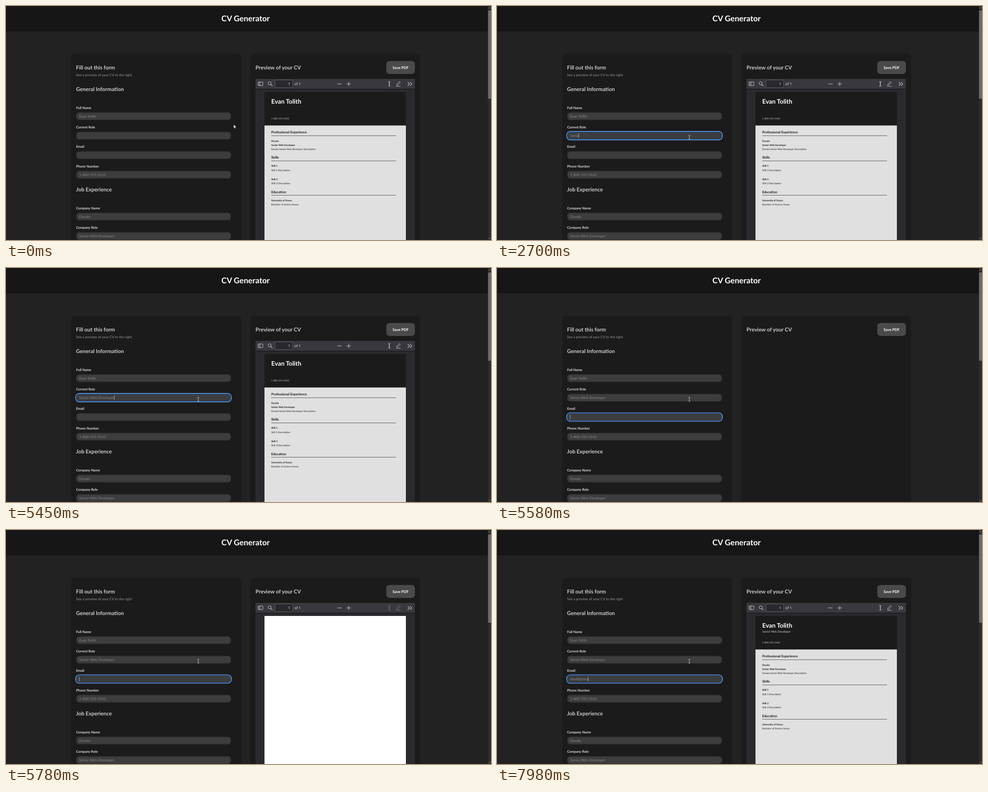
Animation, 1077 px wide and 520 px high, one loop 8 s. Source, as an HTML page:

```html
<!DOCTYPE html>
<html lang="en">
<head>
<meta charset="utf-8">
<title>CV Generator</title>
<style>
html, body { margin: 0; width: 100%; height: 100%; overflow: hidden; background: #222; }
svg { display: block; width: 100vw; height: 100vh; }
text { font-family: Lato, sans-serif; text-rendering: geometricPrecision; white-space: pre; }
</style>
</head>
<body>
<svg id="stage" viewBox="0 0 1077 520"></svg>
<script>
const LOOP = 8000;
const stage = document.getElementById('stage');

function el(parent, tag, attrs, content) {
  const node = document.createElementNS('http://www.w3.org/2000/svg', tag);
  for (const key in attrs) node.setAttribute(key, attrs[key]);
  if (content !== undefined) node.textContent = content;
  parent.appendChild(node);
  return node;
}
const group = parent => el(parent, 'g', {});
const rect = (parent, x, y, width, height, fill, rx = 0, more = {}) =>
  el(parent, 'rect', { x, y, width, height, fill, rx, ...more });
const path = (parent, d, stroke, width = 1, more = {}) =>
  el(parent, 'path', { d, stroke, 'stroke-width': width, fill: 'none', ...more });
const text = (parent, x, y, size, fill, content, bold = false, more = {}) =>
  el(parent, 'text', { x, y, 'font-size': size, fill, 'font-weight': bold ? 700 : 400, ...more }, content);
const show = (node, on) => node.setAttribute('visibility', on ? 'inherit' : 'hidden');

const PERSON = 'Evan Tolith', PHONE = '1-800-555-0142', COMPANY = 'Dovalo';
const ROLE = 'Senior Web Developer', MAIL = 'email@ema';

// Page frame
rect(stage, 0, 0, 1077, 520, '#222222');
rect(stage, 0, 0, 1070, 56.5, '#161616');
text(stage, 532, 34, 17.6, '#ffffff', 'CV Generator', true, { 'text-anchor': 'middle' });
rect(stage, 1070, 0, 7, 520, '#2c2c2c');
rect(stage, 1070.5, 10, 6.5, 196, '#6c6c6c');
path(stage, 'M1071.5 5.5l2.3-2.5 2.3 2.5M1071.5 515l2.3 2.5 2.3-2.5', '#8a8a8a');
rect(stage, 145, 106, 377, 440, '#1b1b1b', 8);
rect(stage, 542.5, 106, 377, 440, '#1b1b1b', 8);

// Form
const heading = (x, y, label) => text(stage, x, y, 11.83, '#cccccc', label, true);
heading(155.5, 141, 'Fill out this form');
text(stage, 155.5, 155.6, 7.7, '#9a9a9a', 'See a preview of your CV to the right');
heading(155.5, 189, 'General Information');
heading(155.5, 412.4, 'Job Experience');

function field(label, y, value) {
  text(stage, 155.7, y - 15.8, 7.5, '#dedede', label, true);
  rect(stage, 156.5, y - 7.7, 342.5, 15.8, '#3d3d3d', 6, { stroke: '#323232', 'stroke-width': 1.4 });
  const ring = group(stage);
  rect(ring, 154.6, y - 9.4, 346, 19, 'none', 8, { stroke: '#8db9f2', 'stroke-width': 1.1 });
  rect(ring, 155.6, y - 8.4, 344, 17, 'none', 7, { stroke: '#1067dc', 'stroke-width': 1.1 });
  const entry = text(stage, 162.4, y + 3, 7.93, '#868686', value);
  const caret = rect(stage, 162, y - 5, 1, 10, '#a8a8a8');
  show(ring, false);
  show(caret, false);
  return { ring, entry, caret };
}
field('Full Name', 244.6, PERSON);
const roleField = field('Current Role', 288, '');
const mailField = field('Email', 331.2, '');
field('Phone Number', 374.6, PHONE);
field('Company Name', 467.7, COMPANY);
field('Company Role', 511, ROLE);

// Preview
heading(554, 141, 'Preview of your CV');
rect(stage, 844.5, 122.3, 63.5, 28.6, '#4a4a4a', 7);
text(stage, 876.3, 139.7, 8.3, '#ffffff', 'Save PDF', true, { 'text-anchor': 'middle' });

const viewer = group(stage);
rect(viewer, 554, 162, 354, 358, '#2a2a2e');
rect(viewer, 554, 162, 354, 22, '#38383d');
rect(viewer, 554, 184, 354, 0.8, '#0c0c0d');
const ICON = '#d2d2d4';
rect(viewer, 559.8, 168.8, 10.6, 8, 'none', 1.2, { stroke: ICON });
path(viewer, 'M564 169v8M561.2 171h1.4M561.2 173h1.4M561.2 175h1.4', ICON, 0.8);
el(viewer, 'circle', { cx: 585.5, cy: 171.8, r: 3.4, fill: 'none', stroke: ICON });
path(viewer, 'M588 174.4l3.6 3.6', ICON, 1.2);
rect(viewer, 597.5, 164.5, 39, 17, '#29292d', 1.5, { stroke: '#606064', 'stroke-width': 0.9 });
path(viewer, 'M735.5 173.2h9.5M756.5 173.2h9M761 168.7v9', ICON);
path(viewer, 'M750.5 167.5v11.5M884.5 167.5v11.5', '#2b2b30');
path(viewer, 'M892 169.2l4 4-4 4M897 169.2l4 4-4 4', ICON, 1.1);
const tools = group(viewer);
path(tools, 'M848.6 167.7q2.6 0 2.6 1.5v7.6q0 1.5-2.6 1.5M853.8 167.7q-2.6 0-2.6 1.5v7.6q0 1.5 2.6 1.5', ICON);
path(tools, 'M867.5 176.2l.7-2.8 5.4-5.6 2 2-5.5 5.6zM866.5 178.4h9.5', ICON, 0.9);
const count = group(viewer);
const ui = { style: 'font-family:"Open Sans",sans-serif' };
text(count, 626.6, 176.2, 8.2, '#f0f0f2', '1', false, ui);
text(count, 640.2, 176.2, 8.2, '#e4e4e6', 'of 1', false, ui);

const blank = rect(viewer, 574, 191, 314, 329, '#ffffff');
const cv = group(viewer);
rect(cv, 574, 191, 314, 329, '#e0e0e0');
rect(cv, 574, 191, 314, 74.5, '#1b1b1b');
const cvText = (y, label, bold, size = 5.3, fill = '#161616') => text(cv, 589, y, size, fill, label, bold);
cvText(217.3, PERSON, true, 13.75, '#ffffff');
const cvRole = cvText(228.2, ROLE, false, 6.4, '#d0d0d0');
cvText(252.2, PHONE, false, 5.3, '#d0d0d0');
for (const [y, label] of [[283.3, 'Professional Experience'], [339.3, 'Skills'], [415.6, 'Education']]) {
  cvText(y, label, true, 7.45);
  rect(cv, 589, y + 4.5, 277, 0.8, '#333333');
}
cvText(301.5, COMPANY, true);
cvText(310.6, ROLE, true);
cvText(319.6, `${COMPANY} ${ROLE} Description`);
cvText(357.4, 'Skill 1', true);
cvText(366.6, 'Skill 1 Description');
cvText(386.6, 'Skill 2', true);
cvText(395.6, 'Skill 2 Description');
cvText(434, 'University of Xxxxx', true);
cvText(443, 'Bachelor of Science Xxxxx');

// Pointers, drawn around their hot spots
const arrow = el(stage, 'path', {
  d: 'M0 0V8.6L2 6.8 3.3 9.8 4.7 9.2 3.4 6.3H6.2Z',
  fill: '#ffffff', stroke: '#000000', 'stroke-width': 0.5
});
const beam = path(stage, 'M-2-4.2h1.4l.6.5.6-.5h1.4M0-3.7v7.6M-2 4.4h1.4l.6-.5.6.5h1.4', '#d0d0d0', 0.9);

const roleKeys = [2180, 2380, 2500, 2600, 2700, 2770, 2970, 3240, 3500, 3560,
  3700, 3850, 4020, 4170, 4260, 4350, 4440, 4640, 4770, 4910];
const mailKeys = [6440, 6620, 6770, 6920, 7120, 7320, 7660, 7840, 7980];
const FOCUS = 1180, TAB = 5580;

function type(target, value, keys, t, focused, blinkOff) {
  const typed = value.slice(0, keys.filter(k => t >= k).length);
  if (target.entry.textContent !== typed) target.entry.textContent = typed;
  const width = typed ? target.entry.getComputedTextLength() : 0;
  target.caret.setAttribute('x', Math.floor(162.5 + width));
  show(target.ring, focused);
  show(target.caret, focused && !(t >= blinkOff && t < keys[0]));
}

function movePointer(t) {
  const step = t < 500 ? 0 : Math.min(8, Math.floor((t - 500) / 68.5) + 1);
  const u = step / 8, p = u * u * (3 - 2 * u);
  const x = 505.5 - 78.5 * p, y = 263.2 + 28.5 * p;
  const over = x < 499 && y > 280;
  for (const node of [arrow, beam]) node.setAttribute('transform', `translate(${x} ${y})`);
  show(arrow, !over);
  show(beam, over);
}

function draw(t) {
  movePointer(t);
  type(roleField, ROLE, roleKeys, t, t >= FOCUS && t < TAB, 1720);
  type(mailField, MAIL, mailKeys, t, t >= TAB, 6050);
  const loading = t >= TAB && t < 5850;
  show(viewer, t < TAB || t >= 5640);
  show(count, t < TAB || t >= 5780);
  show(blank, t >= 5780 && t < 5850);
  show(cv, !loading);
  show(cvRole, t >= 5850);
  tools.setAttribute('opacity', loading ? 0.45 : 1);
}

const start = performance.now();
function tick() {
  draw((performance.now() - start) % LOOP);
  requestAnimationFrame(tick);
}
tick();
</script>
</body>
</html>
```
